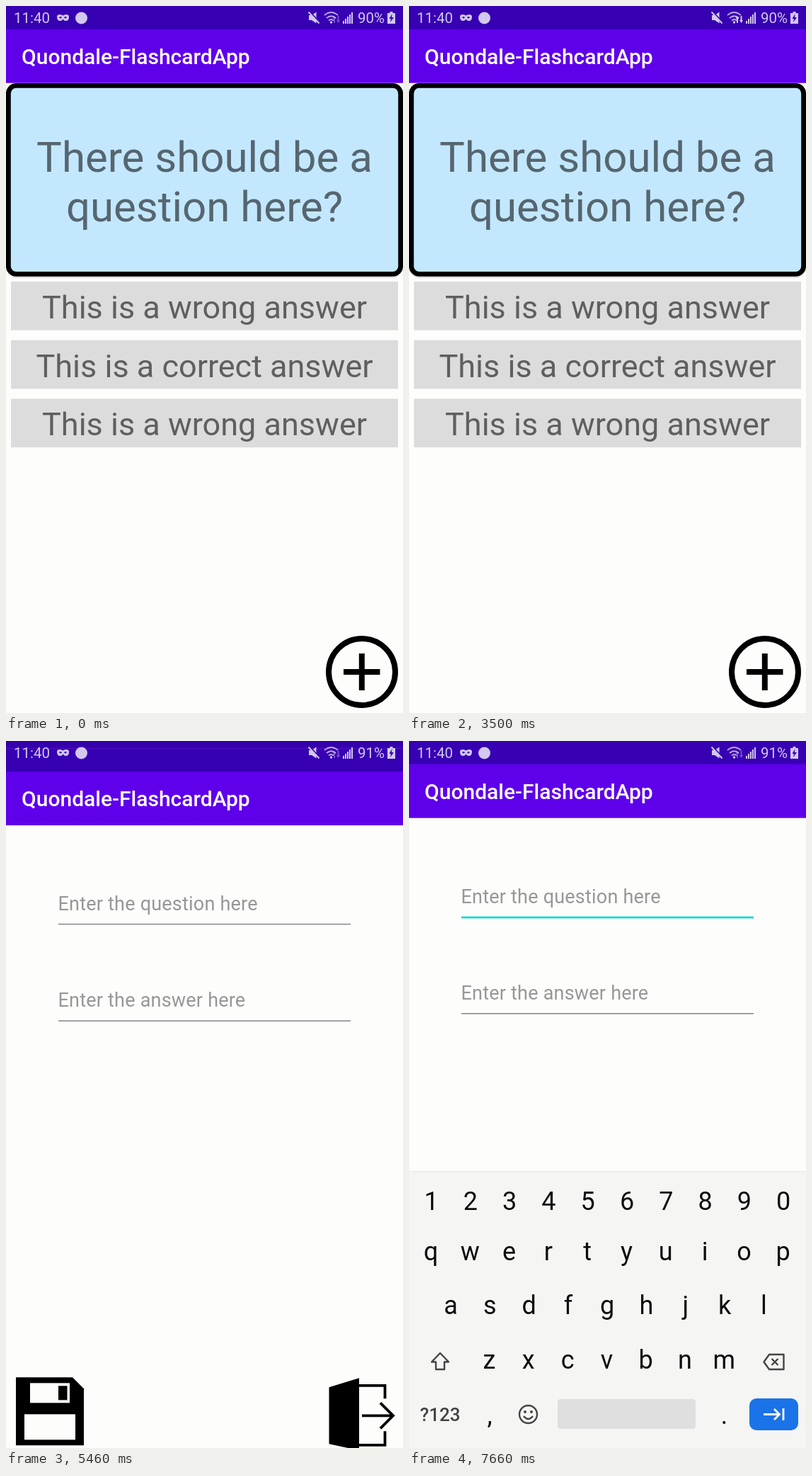
An HTML page that plays this animation: 561x998 px, repeating every 8000 ms.

```html
<!DOCTYPE html>
<html lang="en">
<head>
<meta charset="utf-8">
<title>Flashcards</title>
<style>
html, body { margin: 0; height: 100%; overflow: hidden; background: #fdfdfc; }
svg { display: block; width: 100vw; height: 100vh; font-family: Roboto, "Noto Sans", sans-serif; }
.title { font-size: 30px; font-weight: 500; fill: #fff; }
.mid { text-anchor: middle; }
.question { font-size: 60px; fill: #000; fill-opacity: .56; }
.answer { font-size: 45px; fill: #5f5f5f; }
.hint { font-size: 27px; letter-spacing: .008em; fill: #979797; }
.key { font-size: 36px; fill: #0c0c0c; }
.line { fill: none; stroke: #000; }
.thin { fill: none; stroke: #444; stroke-width: 2.4; stroke-linejoin: round; }
.status { fill: #d3c8ef; }
</style>
</head>
<body>
<svg viewBox="0 0 561 998" preserveAspectRatio="none">
  <rect width="561" height="998" fill="#888"/>
  <g id="home"></g>
  <g id="form"></g>
  <g id="keyboard"></g>
  <g class="status" font-size="20.5">
    <text x="11" y="24">11:40</text>
    <path d="M72 15q0-3 4-3 3 0 4.500 1.500 1.500-1.500 4.500-1.500 4 0 4 3 0 6-4.500 6-2.500 0-4-2.500-1.500 2.500-4 2.500-4.500 0-4.500-6zm3 1q2 3 4 0-2-2-4 0zm7 0q2 3 4 0-2-2-4 0z" fill-rule="evenodd"/>
    <circle cx="106.500" cy="17" r="8.500"/>
    <path d="M428 13h4l6.500-4.500v16l-6.500-4.500h-4z"/>
    <path d="M428 7.500l16 17" stroke="#3700b3" stroke-width="3"/>
    <path d="M427.500 8.500l15 16" stroke="#d3c8ef" stroke-width="2"/>
    <path d="M450 13q9.500-8 19 0M453 17q6.500-5.500 13 0M456 20.500q3.500-3 7 0" fill="none" stroke="#d3c8ef" stroke-width="1.700" opacity=".85"/>
    <circle cx="459.500" cy="23" r="1.700"/>
    <path id="arrows" d="M464 14l2.500 4h-1.500v6h-2v-6h-1.500zM469.500 24l-2.500-4h1.500v-6h2v6h1.500z"/>
    <path d="M476 21h2v4h-2zM479 18h2v7h-2zM482 15h2v10h-2zM485 12h2v13h-2zM488 9h2v16h-2z"/>
    <text id="battery" x="497" y="24">90%</text>
    <path d="M542.500 8h4v2h3.500v15h-11v-15h3.500z"/>
    <path d="M545.500 11l-4 7h2.500l-1 5 5-7h-3z" fill="#3700b3"/>
  </g>
  <circle id="dot" r="15.500" fill="#fff" fill-opacity=".6" stroke="#6868b4" stroke-opacity=".36" stroke-width="2"/>
</svg>
<script>
const LOOP = 8000;
const $ = id => document.getElementById(id);
const rect = (x, y, w, h, fill, more = "") =>
  `<rect x="${x}" y="${y}" width="${w}" height="${h}" fill="${fill}" ${more}/>`;
const text = (x, y, cls, s, more = "") => `<text x="${x}" y="${y}" class="${cls}" ${more}>${s}</text>`;

const page = rect(0, 0, 561, 998, "#fdfdfc") + rect(0, 0, 561, 108.7, "#5f00eb") +
  rect(0, 0, 561, 32.7, "#3700b3") + text(22, 82, "title", "Quondale-FlashcardApp");

const answers = ["wrong", "correct", "wrong"].map((kind, i) => {
  const y = 389 + i * 82.7;
  return rect(7, y, 547, 68.7, "#dcdcdc") +
    text(280.5, y + 52, "answer mid", `This is a ${kind} answer`);
}).join("");

$("home").innerHTML = page +
  rect(1, 113, 559, 271, "#000", 'rx="14" opacity=".12"') +
  rect(3.4, 112.4, 554.2, 266, "#c3e8fe", 'id="card" rx="11" stroke="#000" stroke-width="6.8"') +
  text(280.5, 234, "question mid", "", 'id="top"') +
  text(280.5, 304, "question mid", "", 'id="bottom"') + answers +
  `<circle class="line" cx="503" cy="940" r="47" stroke-width="8"/>
   <path class="line" d="M477 940h51.500M502.800 914v52" stroke-width="8"/>` +
  rect(0, 0, 561, 998, "#000", 'id="shade"');

$("form").innerHTML = page +
  text(73.5, 228.5, "hint", "Enter the question here") + text(73.5, 365, "hint", "Enter the answer here") +
  rect(74, 247.5, 413, 1.5, "#858585", 'id="underline"') + rect(74, 384, 413, 1.5, "#858585") +
  rect(74, 202, 2.7, 32, "#03dac5", 'id="cursor"') +
  `<path d="M14 888h80l16 16v80h-96z"/>` +
  rect(34, 896, 56, 28, "#fdfdfc") + rect(74, 900, 12.5, 20, "#000") + rect(26, 940, 72, 36, "#fdfdfc") +
  `<path d="M456.500 902l42.500-13v102l-42.500-9z"/>
   <path class="line" d="M499 899.500h36.500v18.500M535.500 964v19.500h-36.500M503 942h43M529 924l18 18-18 18" stroke-width="3.800"/>`;

const keyRow = (chars, x, y) =>
  [...chars].map((c, i) => text(x + i * 55.3, y, "key mid", c)).join("");

$("keyboard").innerHTML = rect(0, 608, 561, 390, "#f5f5f4") + rect(0, 607, 561, 1.5, "#ececec") +
  keyRow("1234567890", 31.5, 662) + keyRow("qwertyuiop", 31, 733) +
  keyRow("asdfghjkl", 59, 809) + keyRow("zxcvbnm", 113.5, 886) +
  text(44, 960, "mid", "?123", 'font-size="26" font-weight="500" fill="#444"') +
  text(114, 964, "key mid", ",") + text(445.5, 964, "key mid", ".") +
  rect(210, 929, 195, 42, "#dfdfdf", 'rx="4"') + rect(481, 928, 69, 45, "#1a73e8", 'rx="10"') +
  `<path class="thin" d="M44 864l12 12.500h-6v10.500h-12v-10.500h-6z"/>
   <path class="thin" d="M509 866h20.500v21h-20.500l-7.500-10.500zM512.500 872l9 9M521.500 872l-9 9"/>
   <circle class="thin" cx="168.500" cy="950.500" r="12.500"/>
   <path class="thin" d="M162 953q6.500 8 13 0"/>
   <circle cx="164" cy="947" r="2" fill="#444"/><circle cx="173" cy="947" r="2" fill="#444"/>
   <path d="M501 950.500h22M516 943l7.500 7.500-7.500 7.500M529 942v17" fill="none" stroke="#fff" stroke-width="2.800"/>`;

// start, length, x, y
const taps = [[1880, 600, 374, 278], [2650, 650, 374, 278], [4190, 670, 507, 932], [6350, 700, 361, 234]];
const clamp = v => Math.max(0, Math.min(1, v));
const remaining = (t, start, length) => (1 - clamp((t - start) / length)) ** 3;
const set = (id, attrs) => Object.entries(attrs).forEach(([k, v]) => $(id).setAttribute(k, v));
const show = (id, on) => set(id, { visibility: on ? "visible" : "hidden" });

function draw(t) {
  const flipped = t >= 2000 && t < 2790;
  set("card", { fill: flipped ? "#91d2f8" : "#c3e8fe" });
  $("top").textContent = flipped ? "There should be an" : "There should be a";
  $("bottom").textContent = flipped ? "answer here." : "question here?";

  const slide = remaining(t, 5220, 400);
  const opened = t >= 5220;
  set("home", { transform: `translate(0 ${opened ? -3 - 17 * (1 - slide) : 0})` });
  set("shade", { opacity: opened ? 0.04 : 0 });
  set("form", {
    transform: `translate(0 ${164.6 * slide})`,
    opacity: opened ? 0.9 + 0.1 * clamp((t - 5220) / 60) : 0
  });

  const focused = t >= 6500;
  set("underline", focused
    ? { y: 247.7, height: 2.7, fill: "#03dad0" }
    : { y: 247.5, height: 1.5, fill: "#858585" });
  show("cursor", focused && t < 7400);

  show("keyboard", t >= 7360);
  set("keyboard", { transform: `translate(0 ${391 * remaining(t, 7330, 330)})` });

  set("arrows", { opacity: t >= 3500 && t < 5400 ? 1 : 0.4 });
  $("battery").textContent = t < 3870 ? "90%" : "91%";

  const tap = taps.find(([start, length]) => t >= start && t < start + length);
  show("dot", tap);
  if (tap) {
    const [start, length, cx, cy] = tap;
    set("dot", { cx, cy, opacity: clamp((start + length - t) / (length - 100)) });
  }
}

const began = performance.now();
function tick() {
  draw((performance.now() - began) % LOOP);
  requestAnimationFrame(tick);
}
tick();
</script>
</body>
</html>
```
